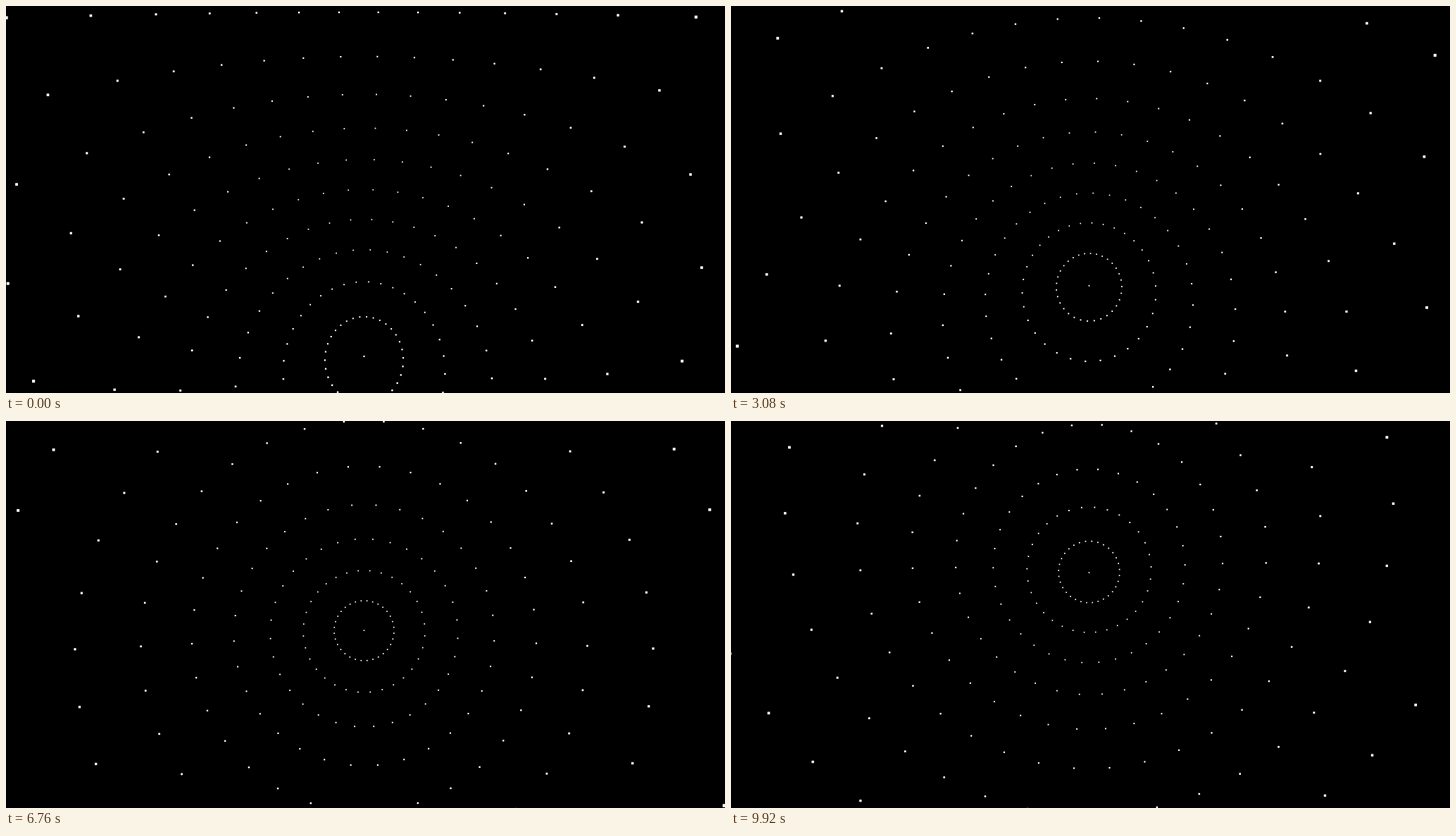
An HTML page with a canvas for the animation above (9.96 s loop, 1021 by 549 pixels).

```html
<!DOCTYPE html>
<html lang="en">
<head>
<meta charset="utf-8">
<title>Inside a sphere of points</title>
<style>
  html, body { margin: 0; width: 100%; height: 100%; overflow: hidden; background: #000; }
  canvas { display: block; }
</style>
</head>
<body>
<canvas id="stage" width="1021" height="549"></canvas>
<script>
const canvas = document.getElementById('stage');
const ctx = canvas.getContext('2d');

const LOOP = 9960, STEP = 40;
const RINGS = 16, SEGMENTS = 32;
const rad = degrees => degrees * Math.PI / 180;

// A unit sphere seen from inside, with a 75 degree vertical field of view.
const CENTER_X = 508.5, CENTER_Y = canvas.height / 2;
const FOCAL = CENTER_Y / Math.tan(rad(37.5));
const CAMERA_DISTANCE = 2 / 3;
const DOT = 2.75;
const TURN = 0.12;   // radians per second, about both axes

function drawDot(x, y, z) {
  const depth = z + CAMERA_DISTANCE;
  if (depth < 0.05) return;
  const size = DOT / depth;
  const px = CENTER_X + FOCAL * x / depth;
  const py = CENTER_Y + FOCAL * y / depth;
  ctx.fillRect(px - size / 2, py - size / 2, size, size);
}

function draw(ms) {
  const turned = TURN * ms / 1000;
  const tilt = rad(52.5) - turned;
  const spin = rad(4.08) + turned;
  const sinT = Math.sin(tilt), cosT = Math.cos(tilt);

  ctx.fillStyle = '#000';
  ctx.fillRect(0, 0, canvas.width, canvas.height);
  ctx.fillStyle = '#fff';

  drawDot(0, sinT, cosT);
  for (let ring = 1; ring < RINGS; ring++) {
    const theta = Math.PI * ring / RINGS;
    const radius = Math.sin(theta), axis = Math.cos(theta);
    for (let i = 0; i < SEGMENTS; i++) {
      const phi = spin + 2 * Math.PI * i / SEGMENTS;
      const up = radius * Math.cos(phi);
      drawDot(radius * Math.sin(phi), axis * sinT - up * cosT, axis * cosT + up * sinT);
    }
  }
}

const start = performance.now();
function tick() {
  const elapsed = (performance.now() - start) % LOOP;
  draw(Math.floor(elapsed / STEP) * STEP);
  requestAnimationFrame(tick);
}
tick();
</script>
</body>
</html>
```
